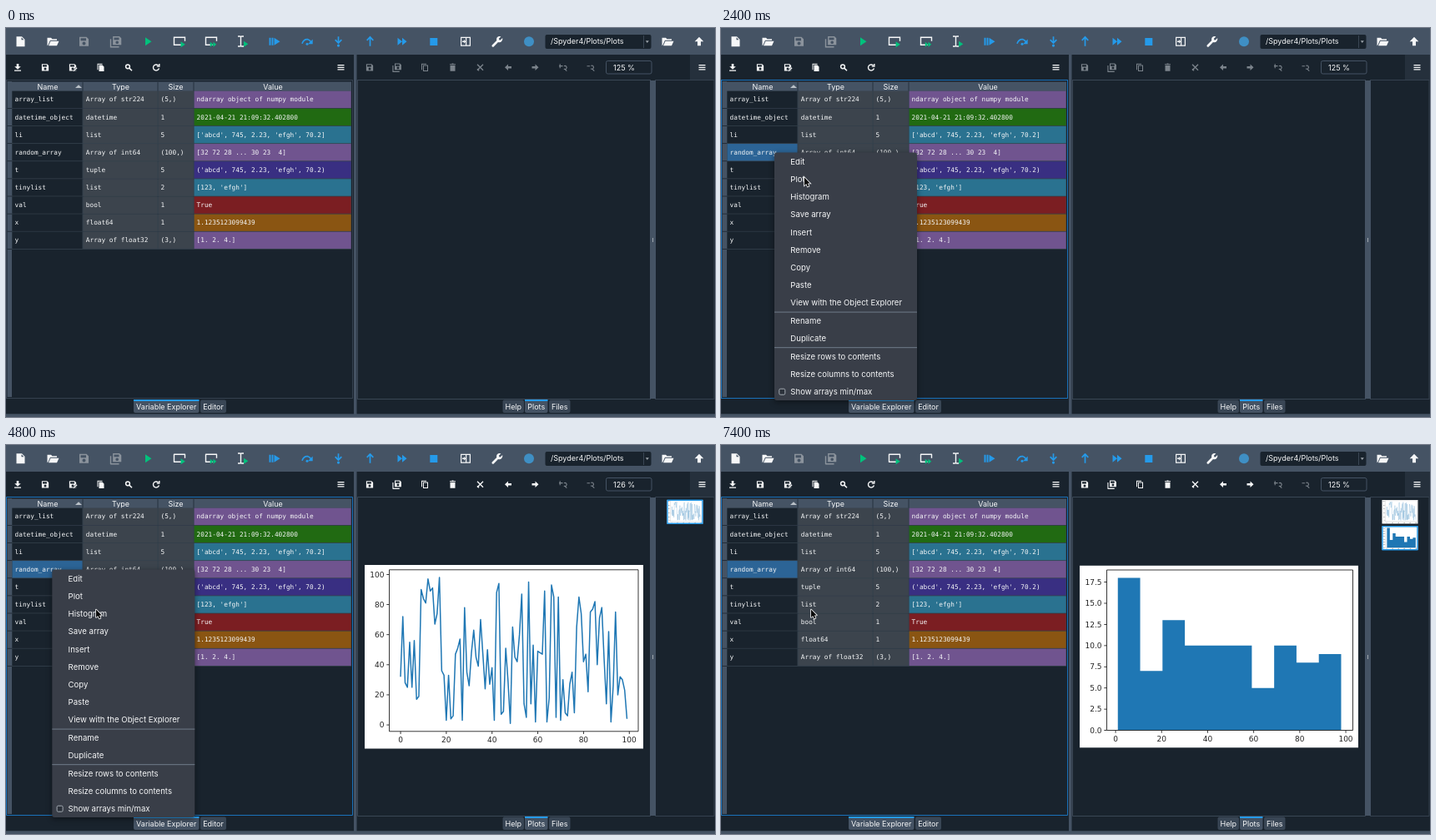
An HTML page with a canvas that plays this animation: 850 by 467 pixels, repeating every 7.6 s.

```html
<!DOCTYPE html>
<html lang="en">
<head>
<meta charset="utf-8">
<title>Plots from the variable explorer</title>
<style>
html, body { margin: 0; width: 100%; height: 100%; overflow: hidden; background: #19232d; }
canvas { display: block; width: 850px; height: 467px; }
</style>
</head>
<body>
<canvas id="stage" width="850" height="467"></canvas>
<script>
const ctx = document.getElementById('stage').getContext('2d');
const LOOP = 7600, STEP = 200;
const MENU_A = 1400, PLOT = 2800, MENU_B = 4000, HIST = 5200;

const BG = '#19232d', BAR = '#455364', WHITE = '#f6f7f8', DIM = '#8b939c', OFF = '#7b838b';
const BLUE = '#259ae9', GREEN = '#00c17c', FOCUS = '#1a72bb', SERIES = '#1f77b4';
const MONO = '7.75px "DejaVu Sans Mono", monospace';
const TICK = '9px "DejaVu Sans", sans-serif';
const ui = size => size + 'px Inter, sans-serif';

const rows = [
  ['array_list', 'Array of str224', '(5,)', 'ndarray object of numpy module', '#70548f'],
  ['datetime_object', 'datetime', '1', '2021-04-21 21:09:32.402800', '#216a12'],
  ['li', 'list', '5', "['abcd', 745, 2.23, 'efgh', 70.2]", '#2a7290'],
  ['random_array', 'Array of int64', '(100,)', '[32 72 28 ... 30 23  4]', '#70548f'],
  ['t', 'tuple', '5', "('abcd', 745, 2.23, 'efgh', 70.2)", '#392f82'],
  ['tinylist', 'list', '2', "[123, 'efgh']", '#2a7290'],
  ['val', 'bool', '1', 'True', '#7b1e22'],
  ['x', 'float64', '1', '1.1235123099439', '#8a5512'],
  ['y', 'Array of float32', '(3,)', '[1. 2. 4.]', '#70548f']
];

const menuItems = [
  ['Edit', 160.5], ['Plot', 181.7], ['Histogram', 203], ['Save array', 224], ['Insert', 245.3],
  ['Remove', 266.5], ['Copy', 287.6], ['Paste', 308.8], ['View with the Object Explorer', 330],
  ['Rename', 352], ['Duplicate', 373], ['Resize rows to contents', 395],
  ['Resize columns to contents', 416], ['Show arrays min/max', 437]
];

const series = [
  32, 72, 28, 25, 55, 25, 56, 17, 19, 90, 84, 81, 97, 89, 91, 67, 74, 98, 36, 33,
  3, 33, 4, 6, 47, 51, 57, 3, 78, 35, 26, 48, 63, 45, 39, 70, 47, 24, 50, 27,
  38, 3, 88, 94, 7, 9, 51, 29, 1, 65, 45, 42, 60, 87, 14, 5, 95, 14, 53, 2,
  49, 48, 47, 89, 2, 18, 93, 85, 5, 85, 3, 30, 8, 6, 27, 35, 8, 65, 85, 74,
  42, 47, 22, 75, 77, 82, 40, 71, 78, 44, 14, 62, 2, 26, 75, 20, 32, 30, 23, 4
];
const counts = [18, 7, 13, 10, 10, 10, 5, 10, 8, 9];

// time, x, y of the pointer tip
const pointerPath = [
  [400, 150, 467], [1200, 63, 149], [1600, 63, 149], [2200, 100, 179.5], [3000, 100, 179.5],
  [3800, 54.5, 149], [4200, 54.5, 149], [4800, 108, 197.5], [LOOP, 108, 197.5]
];

function box(x, y, w, h, color) {
  ctx.fillStyle = color;
  ctx.fillRect(x, y, w, h);
}

function frame(x, y, w, h, color, line = 1) {
  ctx.strokeStyle = color;
  ctx.lineWidth = line;
  ctx.strokeRect(x, y, w, h);
}

function round(x, y, w, h, r, fill, edge) {
  ctx.beginPath();
  ctx.roundRect(x, y, w, h, r);
  if (fill) { ctx.fillStyle = fill; ctx.fill(); }
  if (edge) { ctx.strokeStyle = edge; ctx.lineWidth = 1; ctx.stroke(); }
}

function text(s, x, y, font, color = WHITE, align = 'left') {
  ctx.font = font;
  ctx.fillStyle = color;
  ctx.textAlign = align;
  ctx.fillText(s, x, y + parseFloat(font) * 0.355);
}

// Icons are path data around their own centre; a line width makes them outlines.
function icon(x, y, d, color, line = 0, scale = 1) {
  const path = new Path2D(d);
  ctx.save();
  ctx.translate(x, y);
  ctx.scale(scale, scale);
  if (line) {
    ctx.strokeStyle = color;
    ctx.lineWidth = line;
    ctx.stroke(path);
  } else {
    ctx.fillStyle = color;
    ctx.fill(path, 'evenodd');
  }
  ctx.restore();
}

const shapes = {
  page: 'M-5-6H1.5L5-2.5V6H-5ZM1-5V-2H4Z',
  folder: 'M-6.5 5V-4.5H-2L-.5-3H5V-1.5H-3L-5.5 4ZM-2.5-.5H7.5L5 5H-5Z',
  save: 'M-5.5-5.5H3L5.5-3V5.5H-5.5ZM-4-4V-1H2.5V-4ZM2 2.3A2 2 0 1 0-2 2.3A2 2 0 1 0 2 2.3Z',
  play: 'M-3.5-5L4 0L-3.5 5Z',
  cell: 'M2 4.5H-6.5V-4.5H6.5V0',
  beam: 'M-4.5-6H-2Q-1-6-1-5Q-1-6 0-6H2.5M-1-5V5M-4.5 6H-2Q-1 6-1 5Q-1 6 0 6H2.5',
  debug: 'M-6.5-4.5H-4.5V4.5H-6.5ZM-3.5-4.5H-1.5V4.5H-3.5ZM-.5-4.5L6.5 0L-.5 4.5Z',
  arrowDown: 'M0-6V1.5M-3.8-2.2L0 1.8L3.8-2.2',
  arrowUp: 'M0 6V-4.5M-3.8-1L0-5L3.8-1',
  forward: 'M-5.5-4.5L0 0L-5.5 4.5ZM0-4.5L5.5 0L0 4.5Z',
  panel: 'M-6-5.5H6V5.5H-6ZM-4.8-4.2V4.2H0V-4.2ZM1.2-4.2V4.2H4.8V-4.2ZM-4-.7H-2V-2.5L.2 0L-2 2.5V.7H-4Z',
  wrench: 'M-6.3 4.3L-.8-1.3Q-1.6-5 1.8-6.2Q3.3-6.7 4.4-6L1.9-3.5L2.3-2.1L3.7-1.7L6.2-4.2Q6.9-1.6 5 0Q3.3 1.4 1 .7L-4.3 6.2Q-5.5 6.8-6.3 5.9Q-6.9 5.2-6.3 4.3Z',
  upload: 'M0-5.5L5.3 0H2V5H-2V0H-5.3Z',
  download: 'M-1.3-4.2H1.3V-1H3.8L0 2.5L-3.8-1H-1.3ZM-4 3.3H4V4.4H-4Z',
  copy: 'M-4-4.5H2V-3.5H-3V3H-4ZM-2-2.7H4V4.7H-2ZM-1-1.7V3.7H3V-1.7Z',
  clip: 'M-4-4.5H2L2-3.5H-3V3H-4ZM-2-2.8H2L4-.8V4.7H-2Z',
  trash: 'M-3.5-4H-1.3L-.8-4.7H.8L1.3-4H3.5V-3H-3.5ZM-3-2.2H3V4.5H-3Z',
  search: 'M1.4-1A2.4 2.4 0 1 0-3.4-1A2.4 2.4 0 1 0 1.4-1M.8.8L4 4',
  refresh: 'M2.6-2.2A3.5 3.5 0 1 0 3.4 1M3.8-4.3V-1.2H.8',
  cross: 'M-3.5-3.5L3.5 3.5M3.5-3.5L-3.5 3.5M-3.5 2L-1.5 4',
  left: 'M-4 0L0-3.8V-1.2H4V1.2H0V3.8Z',
  right: 'M4 0L0-3.8V-1.2H-4V1.2H0V3.8Z',
  menu: 'M-4-2.6H4M-4 0H4M-4 2.6H4'
};

function saveAll(x, y, color, scale) {
  icon(x, y, 'M-6.5-3V6.5H3.5', color, 1.4, scale);
  icon(x + 1.2 * scale, y - 1.2 * scale, shapes.save, color, 0, scale * 0.92);
}

function mainToolbar() {
  const y = 16.3;
  box(0, 0, 850, 32, BAR);
  icon(17.5, y, shapes.page, WHITE);
  icon(56, y, shapes.folder, WHITE);
  icon(93.5, y, shapes.save, DIM);
  saveAll(132, y, DIM, 1);
  icon(170.5, y, shapes.play, GREEN);
  icon(208, y - 0.5, shapes.cell, WHITE, 1.4);
  icon(212, y + 3.5, shapes.play, GREEN, 0, 0.7);
  icon(246, y - 0.5, shapes.cell, WHITE, 1.4);
  icon(248.5, y + 3.5, shapes.forward, GREEN, 0, 0.68);
  icon(282.5, y - 0.3, shapes.beam, WHITE, 1.4);
  icon(287.5, y + 3, shapes.play, GREEN, 0, 0.7);
  icon(322, y, shapes.debug, BLUE);
  icon(361, y, 'M-6 2.5Q-4-3.4 1-2.6Q3.3-2 4.7.6', BLUE, 1.7);
  icon(361, y, 'M6.7-2.7V3H1Z', BLUE);
  icon(361, y, 'M-1.5 3A1.5 1.5 0 1 0 1.5 3A1.5 1.5 0 1 0-1.5 3Z', BLUE);
  icon(398.5, y, shapes.arrowDown, BLUE, 1.7);
  icon(398.5, y, 'M-1.6 4.8A1.6 1.6 0 1 0 1.6 4.8A1.6 1.6 0 1 0-1.6 4.8Z', BLUE);
  icon(436.5, y - 0.5, shapes.arrowUp, BLUE, 1.7);
  icon(475, y, shapes.forward, BLUE);
  box(508.3, 12, 9, 9, BLUE);
  icon(551, y, shapes.panel, WHITE);
  icon(589, y, shapes.wrench, WHITE);
  ctx.beginPath();
  ctx.arc(627, y, 6, 0, Math.PI * 2);
  ctx.fillStyle = '#3f8fc4';
  ctx.fill();
  round(646.5, 8, 127, 17, 2, BG);
  box(764, 9, 1, 15, '#3a4654');
  icon(768.8, 16.5, 'M-2-1.2H2L0 1.4Z', '#9da4ab');
  text('/Spyder4/Plots/Plots', 653, 16.3, ui(9));
  icon(793, y, shapes.folder, WHITE);
  icon(831, y, shapes.upload, WHITE);
}

function tab(label, x, w, active) {
  round(x, 446.5, w, 15.5, 2, active ? BAR : '#394655');
  if (active) box(x, 446, w, 2, BLUE);
  text(label, x + w / 2, 455, ui(9), WHITE, 'center');
}

function explorer(focused) {
  const y = 47.3;
  icon(14, y, shapes.download, WHITE);
  icon(47, y, shapes.save, WHITE, 0, 0.75);
  icon(80, y, shapes.save, WHITE, 0, 0.75);
  icon(82.5, y + 2, 'M-1.5 2.5L2.5-1.5', BG, 2.6);
  icon(82.5, y + 2, 'M-1.5 2.5L2.5-1.5', WHITE, 1.4);
  icon(113.5, y, shapes.clip, WHITE);
  icon(147, y, shapes.search, WHITE, 1.5);
  icon(180, y, shapes.refresh, WHITE, 1.4);
  icon(401.5, y, shapes.menu, WHITE, 1.3);

  frame(0.5, 62.5, 415, 382, focused ? FOCUS : '#35414f');
  box(1.5, 64, 5.5, 379, BAR);
  box(7, 64.5, 407, 11.5, BAR);
  [['Name', 50], ['Type', 137.5], ['Size', 203.5], ['Value', 320]]
    .forEach(([s, x]) => text(s, x, 70.5, ui(9), WHITE, 'center'));
  [91.5, 181.5, 224.5].forEach(x => box(x, 65, 1, 11, '#26323e'));
  icon(87, 70.3, 'M-4 1.8H4L0-2Z', '#b9c0c7');

  rows.forEach((row, i) => {
    const top = 75.7 + i * 21.12, h = 20.3, mid = top + 10;
    box(7, top, 407, 21.12, '#35414d');
    box(7.5, top, 84, h, focused && i === 3 ? '#2c6496' : BG);
    box(92.8, top, 88.7, h, '#3c444d');
    box(182.8, top, 41.7, h, '#3c444d');
    box(225.6, top, 188, h, row[4]);
    box(1.5, top + h, 5.5, 0.8, BG);
    [10.6, 95.8, 185.5, 228.6].forEach((x, c) => text(row[c], x, mid, MONO));
  });
  tab('Variable Explorer', 153, 78.5, true);
  tab('Editor', 233, 31, false);
}

function axes(x0, x1, y0, y1, xAt, yAt, yTicks) {
  frame(x0, y0, x1 - x0, y1 - y0, '#222', 0.9);
  for (let v = 0; v <= 100; v += 20) {
    box(xAt(v) - 0.4, y1, 0.9, 3.2, '#222');
    text(String(v), xAt(v), y1 + 10.3, TICK, '#222', 'center');
  }
  yTicks.forEach(([v, label]) => {
    box(x0 - 3.2, yAt(v) - 0.4, 3.2, 0.9, '#222');
    text(label, x0 - 6, yAt(v), TICK, '#222', 'right');
  });
}

function linePlot() {
  const xAt = v => 473 + v * 2.742, yAt = v => 336 - v * 1.806;
  box(430, 144, 334, 220.5, '#fff');
  ctx.beginPath();
  series.forEach((v, i) => ctx.lineTo(xAt(i), yAt(v)));
  ctx.strokeStyle = SERIES;
  ctx.lineWidth = 1.5;
  ctx.lineJoin = 'round';
  ctx.stroke();
  axes(459.5, 758, 149.8, 343.8, xAt, yAt, [0, 20, 40, 60, 80, 100].map(v => [v, String(v)]));
}

function histogram() {
  const xAt = v => 473 + v * 2.76, yAt = v => 342.5 - v * 10.17;
  box(430, 144.8, 334, 218.5, '#fff');
  ctx.beginPath();
  ctx.moveTo(xAt(1), yAt(0));
  counts.forEach((n, i) => {
    ctx.lineTo(xAt(1 + i * 9.7), yAt(n));
    ctx.lineTo(xAt(10.7 + i * 9.7), yAt(n));
  });
  ctx.lineTo(xAt(98), yAt(0));
  ctx.fillStyle = SERIES;
  ctx.fill();
  const ticks = Array.from({ length: 8 }, (_, i) => [i * 2.5, (i * 2.5).toFixed(1)]);
  axes(462.5, 757.5, 150, 342.5, xAt, yAt, ticks);
}

function thumb(draw, y, active) {
  ctx.save();
  ctx.translate(792.5, y);
  ctx.scale(43 / 334, 28.5 / 220.5);
  ctx.translate(-430, -144);
  draw();
  ctx.restore();
  if (active) frame(793, y + 0.3, 42, 28, BLUE, 1.4);
}

function plots(t) {
  const y = 47.3, on = t >= PLOT, hist = t >= HIST, color = on ? WHITE : OFF;
  icon(436, y, shapes.save, color, 0, 0.75);
  saveAll(469, y, color, 0.78);
  icon(502, y, shapes.copy, color);
  icon(535.5, y, shapes.trash, color);
  icon(568.5, y, shapes.cross, color, 1.4);
  icon(602, y, shapes.left, color);
  icon(634.5, y, shapes.right, color);
  icon(668, y, 'M-3.8-4V1M-5-1.7H-.5M1-1.5A2 2 0 1 1 .9 1.7M2 2L4.3 4.3', OFF, 1.1);
  icon(701, y, 'M-4.5-1.5H-1M.3-1.8A2 2 0 1 1 .2 1.4M2 2L4.3 4.3', OFF, 1.1);
  round(719.5, 39.5, 54.5, 15.5, 2, null, BAR);
  text(on && !hist ? '126 %' : '125 %', 728, 47.5, ui(9));
  box(820, 32, 30, 30.5, '#25303c');
  icon(834.5, y, shapes.menu, WHITE, 1.3);

  frame(421.5, 62.5, 351, 383, '#3a4755');
  frame(778.5, 62.5, 70.5, 383, '#35414f');
  box(772, 63, 7, 382, BAR);
  box(775, 252, 1, 5, '#a0a8b0');
  if (on) {
    if (hist) histogram(); else linePlot();
    thumb(linePlot, 66, !hist);
    if (hist) thumb(histogram, 97.5, true);
  }
  tab('Help', 595.5, 25.5, false);
  tab('Plots', 622, 27.5, true);
  tab('Files', 651, 25.5, false);
}

function contextMenu(x) {
  ctx.save();
  ctx.shadowColor = 'rgba(0,0,0,.45)';
  ctx.shadowBlur = 7;
  ctx.shadowOffsetY = 2;
  round(x, 149.5, 171, 297.5, 3, '#393e48');
  ctx.restore();
  menuItems.forEach(([s, y]) => text(s, x + 19.3, y, ui(9.6)));
  [340.5, 383].forEach(y => box(x, y, 171, 1.2, '#66717e'));
  round(x + 5.8, 433.2, 7, 7, 1.5, '#2c323b', '#a4abb3');
}

function pointer(t) {
  if (t < pointerPath[0][0]) return;
  const i = pointerPath.findIndex(p => p[0] > t);
  const [ta, xa, ya] = pointerPath[i - 1], [tb, xb, yb] = pointerPath[i];
  const k = (t - ta) / (tb - ta), e = k * k * (3 - 2 * k);
  const d = 'M0 0V9.4L2.2 7.5L3.8 11L5.4 10.3L3.9 6.9H6.8Z';
  const x = xa + (xb - xa) * e, y = ya + (yb - ya) * e;
  icon(x, y, d, WHITE, 1.6);
  icon(x, y, d, '#0a0a0a');
}

function draw(now) {
  const t = Math.floor((now % LOOP) / STEP) * STEP;
  box(0, 0, 850, 467, BG);
  mainToolbar();
  box(417, 32, 3.5, 435, BAR);
  box(0, 463.3, 850, 3.7, BAR);
  explorer(t >= MENU_A);
  plots(t);
  if (t >= MENU_A && t < PLOT) contextMenu(64);
  if (t >= MENU_B && t < HIST) contextMenu(55.3);
  pointer(t);
}

const start = performance.now();
function tick() {
  draw(performance.now() - start);
  requestAnimationFrame(tick);
}
tick();
</script>
</body>
</html>
```
